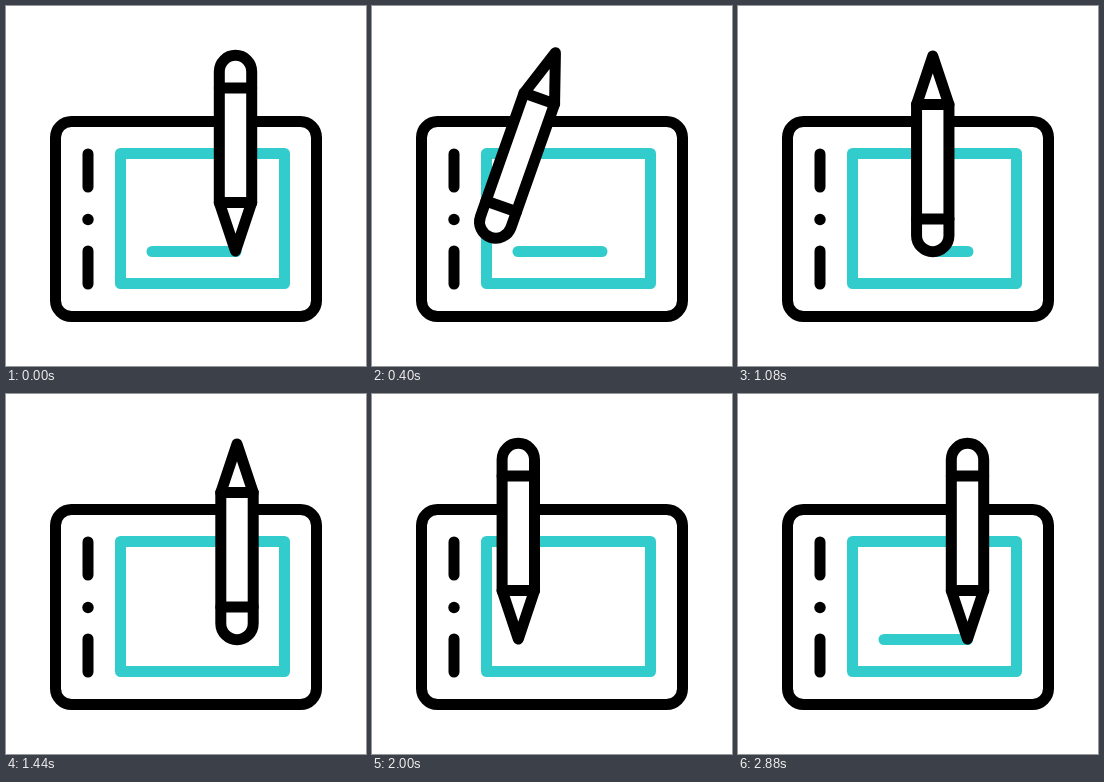
Recreate the animation shown at these times as an HTML page with a canvas. Size 360x360 px, loop 3000 ms.

```html
<!DOCTYPE html>
<html lang="en">
<head>
<meta charset="utf-8">
<title>Drawing tablet</title>
<style>
  html, body { margin: 0; width: 100%; height: 100%; overflow: hidden; background: #fff; }
  canvas { display: block; width: 360px; height: 360px; }
</style>
</head>
<body>
<canvas id="stage"></canvas>
<script>
const LOOP = 3000, STEP = 40;
const BLACK = '#000', TEAL = '#33cccc';
const LINE = { start: 146, end: 230, y: 245.5 };
const PEN_Y = 147.5;

const canvas = document.getElementById('stage');
const ctx = canvas.getContext('2d');
const scale = window.devicePixelRatio || 1;
canvas.width = canvas.height = 360 * scale;

const mix = (a, b, p) => a + (b - a) * p;
const span = (t, from, to) => Math.min(1, Math.max(0, (t - from) / (to - from)));
const easeInOut = p => p < 0.5 ? 2 * p * p : 1 - 2 * (1 - p) ** 2;

// Equivalent to cubic-bezier(1/3, 0, 1/3, 1)
function easeSettle(p) {
  let low = 0, high = 1;
  for (let i = 0; i < 24; i++) {
    const s = (low + high) / 2;
    if (s - s * s + s ** 3 < p) low = s; else high = s;
  }
  return low * low * (3 - 2 * low);
}

function flip(p, fromX, toX, fromAngle, toAngle, lift) {
  return {
    x: mix(fromX, toX, p),
    y: PEN_Y - lift * 4 * p * (1 - p),
    angle: mix(fromAngle, toAngle, p)
  };
}

function poseAt(t) {
  if (t < 600) {
    const pen = flip(easeSettle(span(t, 80, 560)), 229.5, 141.5, 0, -Math.PI, 23);
    return { pen, line: [LINE.start, LINE.end] };
  }
  if (t < 1480) {
    const x = mix(141.5, 231, easeInOut(span(t, 640, 1440)));
    return { pen: { x, y: PEN_Y, angle: -Math.PI }, line: [Math.max(x, LINE.start), LINE.end] };
  }
  if (t < 2040) {
    const pen = flip(easeSettle(span(t, 1520, 2000)), 231, 146.3, -Math.PI, 0, 17);
    return { pen, line: null };
  }
  const x = mix(146.3, 229.5, easeInOut(span(t, 2080, 2880)));
  return { pen: { x, y: PEN_Y, angle: 0 }, line: [LINE.start, x] };
}

function stroke(color, build) {
  ctx.strokeStyle = color;
  ctx.beginPath();
  build();
  ctx.stroke();
}

function segment(color, x1, y1, x2, y2) {
  stroke(color, () => {
    ctx.moveTo(x1, y1);
    ctx.lineTo(x2, y2);
  });
}

function drawTablet() {
  stroke(BLACK, () => ctx.roundRect(49.5, 115.5, 261, 195, 16));
  stroke(TEAL, () => ctx.rect(114.5, 147.5, 164, 130));
  segment(BLACK, 82, 148, 82, 181);
  segment(BLACK, 82, 245, 82, 278);
  ctx.fillStyle = BLACK;
  ctx.beginPath();
  ctx.arc(82, 213.5, 5.7, 0, Math.PI * 2);
  ctx.fill();
}

function drawPen({ x, y, angle }) {
  const half = 16.2, cap = -82, band = -65.5, collar = 49, tip = 97.5;
  ctx.save();
  ctx.translate(x, y);
  ctx.rotate(angle);
  stroke(BLACK, () => {
    ctx.moveTo(-half, collar);
    ctx.lineTo(-half, cap);
    ctx.arc(0, cap, half, Math.PI, 0);
    ctx.lineTo(half, collar);
    ctx.lineTo(0, tip);
    ctx.closePath();
    ctx.fillStyle = '#fff';
    ctx.fill();
  });
  segment(BLACK, -half, band, half, band);
  segment(BLACK, -half, collar, half, collar);
  ctx.restore();
}

function draw(t) {
  const { pen, line } = poseAt(t);
  ctx.setTransform(scale, 0, 0, scale, 0, 0);
  ctx.fillStyle = '#fff';
  ctx.fillRect(0, 0, 360, 360);
  ctx.lineWidth = 11;
  ctx.lineCap = ctx.lineJoin = 'round';
  drawTablet();
  if (line && line[1] - line[0] > 0.5) segment(TEAL, line[0], LINE.y, line[1], LINE.y);
  drawPen(pen);
}

const began = performance.now();
function tick() {
  const t = (performance.now() - began) % LOOP;
  draw(Math.floor(t / STEP) * STEP);
  requestAnimationFrame(tick);
}
tick();
</script>
</body>
</html>
```
